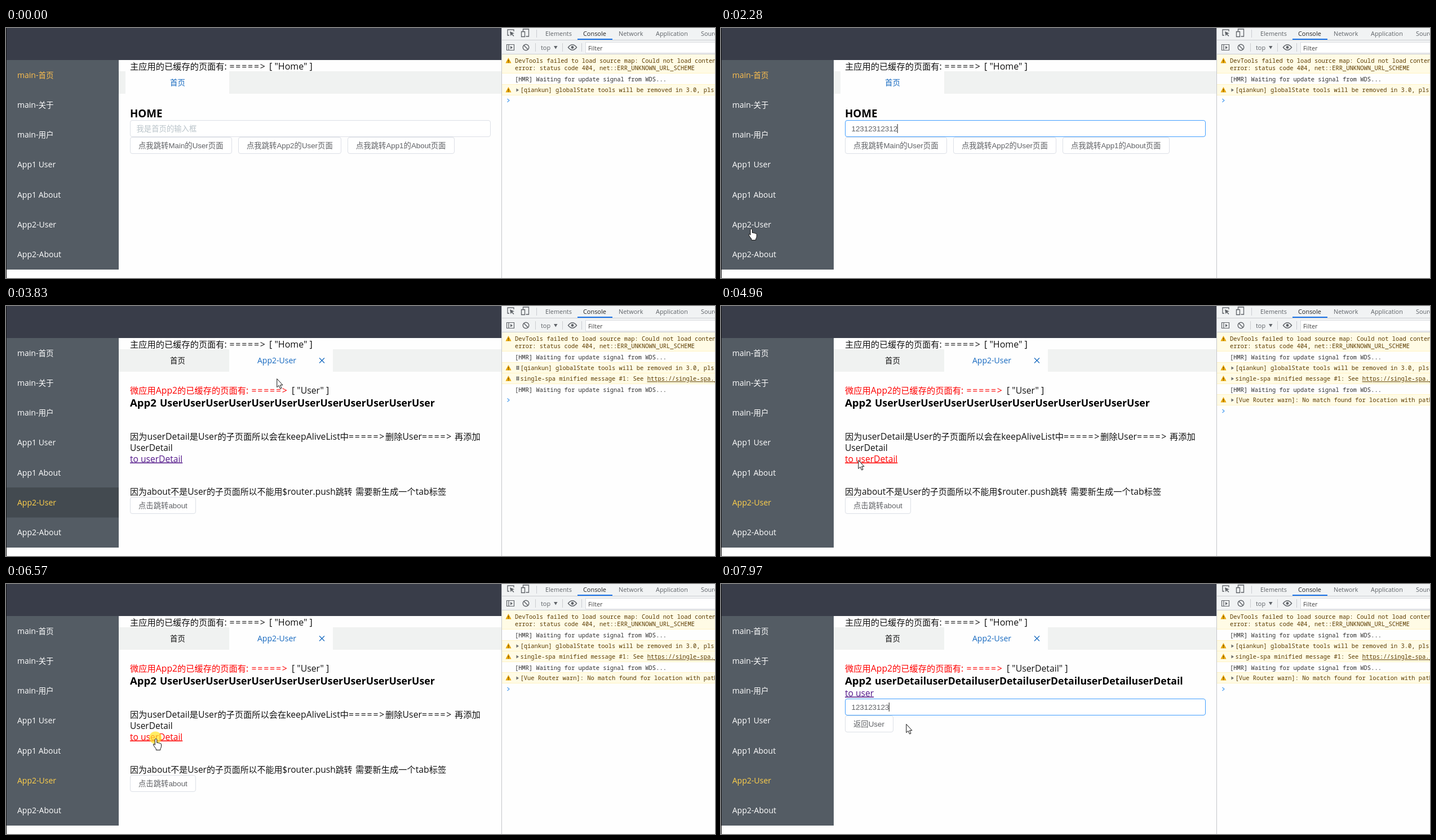
Write an HTML page that moves like this. It is 1258 px wide and 445 px high and loops after 8000 ms.

```html
<!DOCTYPE html>
<html lang="zh">
<head>
<meta charset="utf-8">
<title>Tabs</title>
<style>
html, body { margin: 0; width: 100%; height: 100%; overflow: hidden; background: #fefefe; }
svg { display: block; width: 100vw; height: 100vh; }
text { white-space: pre; }
.ui { font-family: "Open Sans", "Noto Sans CJK SC", "Noto Sans CJK", sans-serif; }
.el { font: 13.35px "Liberation Sans", "Noto Sans CJK SC", "Noto Sans CJK", sans-serif; fill: #606266; }
.mono { font: 10.43px "Noto Sans Mono", "DejaVu Sans Mono", monospace; fill: #303030; }
.warn { fill: #5c3c00; }
.bold { font-weight: 700; }
.link { text-decoration: underline; }
</style>
</head>
<body>
<svg id="stage" viewBox="0 0 1258 445" preserveAspectRatio="none"></svg>
<script>
const LOOP = 8000;
const LINK = '#551a8b', BLUE = '#1568bf';

const rect = (x, y, w, h, fill, more = '') =>
  `<rect x="${x}" y="${y}" width="${w}" height="${h}" fill="${fill}" ${more}/>`;
const path = (d, stroke, more = '') => `<path d="${d}" fill="none" stroke="${stroke}" ${more}/>`;
const text = (x, y, str, cls, more = '') => `<text x="${x}" y="${y}" class="${cls}" ${more}>${str}</text>`;
const group = (id, body) => `<g id="${id}">${body}</g>`;

// Chinese runs are set slightly smaller, arrows of "=" slightly wider.
function mix(x, y, str, size = 15.8, fill = '#111', more = '') {
  const runs = str.match(/[\u3000-\u9fff]+|[=>]+|[^\u3000-\u9fff=>]+/g).map(run => {
    if (/[\u3000-\u9fff]/.test(run)) return `<tspan font-size="${size * 0.965}">${run}</tspan>`;
    if (/[=>]/.test(run)) return `<tspan letter-spacing=".115em">${run}</tspan>`;
    return `<tspan>${run}</tspan>`;
  });
  return text(x, y, runs.join(''), 'ui', `font-size="${size}" fill="${fill}" ${more}`);
}

const frame = (x, y, w, h, more = '') =>
  rect(x + .5, y + .5, w - 1, h - 1, '#fff', `rx="3.5" stroke="#dcdfe6" ${more}`);
const button = (x, y, w, label) => frame(x, y, w, 30) + text(x + 15, y + 20, label, 'el');
const field = (id, y) =>
  frame(220, y, 640, 30, `id="${id}Box"`) + text(231.5, y + 20, '', 'el', `id="${id}Text"`) +
  rect(0, y + 7, 1, 16, '#222', `id="${id}Caret"`);

function heading(y, rest, size) {
  return text(220, y, 'App2', 'ui bold', 'font-size="18.6"') +
    text(273, y, rest, 'ui bold', `font-size="${size}"`);
}

const menu = ['main-首页', 'main-关于', 'main-用户', 'App1 User', 'App1 About', 'App2-User', 'App2-About'];

function shell() {
  return rect(0, 0, 1258, 445, '#fefefe') + rect(0, 0, 880, 57, '#393d49') +
    rect(0, 57, 200, 373, '#545c64') + rect(0, 323, 200, 53.5, '#434a50', 'id="hover"') +
    rect(0, 0, 1, 445, '#111') +
    menu.map((m, i) => mix(20, 88.7 + i * 53.2, m, 14, '#fff', `id="item${i}" font-weight="500"`)).join('') +
    mix(220, 73.5, '主应用的已缓存的页面有:') + mix(396.5, 73.5, '=====>') + mix(467, 73.5, '[ "Home" ]', 16) +
    rect(200, 77, 680, 40, '#f0f2f1') + rect(212, 77, 184, 40, '#fefefe', 'id="tabBg"') +
    mix(291, 102, '首页', 13.9, BLUE, 'id="homeTab"') +
    group('appTab', mix(446, 102, 'App2-User', 14, BLUE) + path('M556 92.5l9 9m0-9l-9 9', BLUE, 'stroke-width="1.2"'));
}

function pages() {
  const cached = (names) =>
    mix(220, 156, '微应用App2的已缓存的页面有:', 15.8, '#f00') + mix(435.5, 156, '=====>', 15.8, '#f00') +
    mix(507, 156, `[ "${names}" ]`);
  return group('home', text(220, 159, 'HOME', 'ui bold', 'font-size="18.8"') + field('home', 164) +
      button(220, 194, 181, '点我跳转Main的User页面') + button(412, 194, 183, '点我跳转App2的User页面') +
      button(606, 194, 190, '点我跳转App1的About页面')) +
    group('user', cached('User') + heading(179, 'User'.repeat(12), 17.7) +
      mix(220, 238, '因为userDetail是User的子页面所以会在keepAliveList中') +
      mix(608, 238, '=====>删除User====>') + mix(796, 238, '再添加') + mix(220, 258, 'UserDetail', 15.5) +
      text(220, 277.5, 'to userDetail', 'ui link', 'font-size="15.6" id="toDetail"') +
      mix(220, 336, '因为about不是User的子页面所以不能用$router.push跳转', 15.5) +
      mix(620, 336, '需要新生成一个tab标签') + button(220, 340, 117, '点击跳转about')) +
    group('detail', cached('UserDetail') + heading(179, 'userDetail'.repeat(6), 17.6) +
      text(220, 199.5, 'to user', 'ui link', `font-size="15.6" fill="${LINK}"`) +
      field('detail', 204) + button(220, 234, 86, '返回User'));
}

function devtools() {
  const label = (x, y, s, fill = '#5f6368') => text(x, y, s, 'ui', `font-size="10.9" fill="${fill}"`);
  const band = (y, h) => rect(880, y, 378, h, '#fffbe5') +
    path(`M880 ${y - .5}h378m0 ${h}h-378`, '#fff3c4');
  const sign = y => `<path d="M891.5 ${y - 5}l5 9.5h-10z" fill="#e8a500"/>` +
    path(`M891.5 ${y - 1.5}v3m0 1v1.3`, '#4a3300');
  const fold = y => `<path class="fold" d="M905.5 ${y - 3}l4.5 3-4.5 3z" fill="#6e6e6e"/>` +
    path(`M905.5 ${y - 3}h5m-5 2.5h5m-5 2.5h5m-4 1v-7m3 0v7`, '#555', 'class="glitch"');
  const warning = (y, s) => band(y, 19) + sign(y + 9) + fold(y + 9.5) + text(912.5, y + 13.3, s, 'mono warn');
  const hmr = y => text(903, y, '[HMR] Waiting for update signal from WDS...', 'mono');
  const icon = '#5f6368';
  return rect(879, 0, 379, 445, '#fefefe') + rect(880, 0, 378, 47, '#f1f3f4') +
    rect(880, 21, 378, 1, '#cbcdd1') + rect(879, 0, 1, 445, '#c4c6ca') +
    path('M893 13h-3v-10h11v3', icon, 'stroke-width="1.3"') +
    `<path d="M894 6l8 3.5-3.5 1 3 3.5-1.2 1-3-3.5-1.8 3z" fill="${icon}"/>` +
    path('M917.5 6v-4h10v13h-5M914.5 6.5h6v9h-6z', icon, 'stroke-width="1.3"') +
    path('M941.5 3v14M939.5 27v15M987.5 27v15M1021.5 27v15', '#cbcdd1') +
    label(957, 13.5, 'Elements') + label(1024, 13.5, 'Console', '#222') + label(1087, 13.5, 'Network') +
    label(1153, 13.5, 'Application') + label(1233, 13.5, 'Sources') + rect(1014, 19, 62, 2, '#1a73e8') +
    path('M888.5 29.5h13v10h-13zM892 29v11', icon, 'stroke-width="1.2"') +
    `<path d="M895 32l4 2.7-4 2.7z" fill="${icon}"/>` +
    `<circle cx="922.5" cy="34.5" r="5.3" fill="none" stroke="${icon}" stroke-width="1.4"/>` +
    path('M919 31l7 7', icon, 'stroke-width="1.4"') +
    label(949, 39, 'top') + `<path d="M972 32h6.5l-3.2 5.5z" fill="${icon}"/>` +
    path('M997.5 34.5q7.5-9.5 15 0q-7.5 9.5-15 0z', icon, 'stroke-width="1.5"') +
    `<circle cx="1005" cy="34.5" r="2.4" fill="${icon}"/>` +
    rect(1028.5, 25.5, 240, 19, '#fff', 'stroke="#dadce0"') + label(1033, 39.5, 'Filter', '#444') +
    band(47, 34) + rect(880, 46, 378, 1, '#cbcdd1') + sign(58) +
    text(903, 62, 'DevTools failed to load source map: Could not load content', 'mono warn') +
    text(903, 75.3, 'error: status code 404, net::ERR_UNKNOWN_URL_SCHEME', 'mono warn') + hmr(95.3) +
    warning(101, '[qiankun] globalState tools will be removed in 3.0, pls') +
    group('spa', warning(120, 'single-spa minified message #1: See <tspan class="link">https://single-spa.js</tspan>')) +
    group('hmr', hmr(153.3)) +
    group('router', warning(158, '[Vue Router warn]: No match found for location with path')) +
    path('M889.5 126l3.5 3-3.5 3', '#4a9df0', 'stroke-width="1.2" id="prompt"');
}

function pointers() {
  const shape = (id, d) => `<path id="${id}" d="${d}" fill="#fff" stroke="#111" stroke-linejoin="round"/>`;
  return group('pointer',
    '<circle id="click" cx="-1" cy="-1.5" r="11" fill="#ffe629" fill-opacity=".72"/>' +
    shape('arrow', 'M.8.5v15l3.4-3 2.4 5.5 2.4-1-2.4-5.3h4.4z') +
    shape('hand', 'M-1.7 1.6q1.7-2.4 3.4 0v6q1.4-1 2.8.5 1.4-.8 2.6.7 2-.5 2.4 1.4v4q-.3 2.5-1.6 4.2v2.2h-7.6v-2.2q-3-3.4-5-7.4 .2-2 2-.9l1 1.3z') +
    path('M-3.5-8h2.5l1 1 1-1h2.5M0-7v14M-3.5 8h2.5l1-1 1 1h2.5', '#222', 'id="beam" stroke-width="1.2"'));
}

const stage = document.getElementById('stage');
stage.innerHTML = shell() + pages() + devtools() + pointers();
const el = {};
stage.querySelectorAll('[id]').forEach(n => el[n.id] = n);
const folds = stage.querySelectorAll('.fold'), glitches = stage.querySelectorAll('.glitch');

// time, x, y
const track = [
  [0, 750, 470], [205, 750, 470], [210, 748, 438], [290, 601, 438], [540, 598, 436], [800, 460, 330],
  [1050, 250, 225], [1150, 210, 195], [1340, 275, 187], [1440, 283, 170], [1740, 283, 170],
  [2000, 235, 235], [2250, 60, 350], [2400, 30, 384], [2510, 50, 386], [2700, 80, 377], [2970, 91, 369],
  [3300, 91, 366], [3440, 120, 340], [3600, 330, 210], [3830, 480, 129], [4190, 470, 146],
  [4600, 330, 250], [4960, 243, 274], [5200, 243, 274], [5500, 264, 248], [5900, 267, 234],
  [6400, 266, 275], [6640, 266, 275], [6800, 288, 228], [6950, 306, 211], [7130, 310, 211],
  [7300, 334, 232], [7969, 334, 232], [7970, 328, 249], [8000, 328, 249]
];
const kinds = [[0, 'arrow'], [1340, 'beam'], [1900, 'arrow'], [2250, 'hand'], [3440, 'arrow'],
  [5400, 'hand'], [6760, 'arrow'], [6900, 'beam'], [7970, 'arrow']];
const clicks = [[1500, 1740], [3200, 3300], [5050, 5130], [5600, 5700], [6570, 6720], [7110, 7200]];

const within = (t, a, b) => t >= a && t < b;
const show = (node, on) => node.setAttribute('display', on ? 'inline' : 'none');
const clamp = (v, a, b) => Math.min(b, Math.max(a, v));

function place(t) {
  const i = Math.max(1, track.findIndex(k => k[0] > t));
  const [t0, x0, y0] = track[i - 1], [t1, x1, y1] = track[i];
  const p = (t - t0) / (t1 - t0);
  return [x0 + (x1 - x0) * p, y0 + (y1 - y0) * p];
}

function input(id, count, border, caret, hint = '') {
  el[id + 'Text'].textContent = '123'.repeat(5).slice(0, count) || hint;
  el[id + 'Text'].style.fill = count ? '#606266' : '#b9c3c9';
  el[id + 'Box'].setAttribute('stroke', border);
  el[id + 'Caret'].setAttribute('x', 231 + count * 7.42);
  show(el[id + 'Caret'], caret);
}

function draw(t) {
  const app = t >= 3290;
  const detail = within(t, 5050, 5650) || t >= 6640;
  show(el.home, !app);
  show(el.detail, detail);
  show(el.user, t >= 3480 && !detail);
  show(el.appTab, app);
  el.tabBg.setAttribute('x', app ? 396 : 212);
  el.homeTab.setAttribute('fill', app ? '#111' : BLUE);
  el.item0.setAttribute('fill', app ? '#fff' : '#fdbf4e');
  el.item5.setAttribute('fill', app ? '#ffd04b' : '#fff');
  show(el.hover, within(t, 2300, 4000));

  const pressed = within(t, 4960, 5050) || within(t, 6570, 6640);
  el.toDetail.setAttribute('fill', pressed ? '#f00' : LINK);
  input('home', clamp(Math.ceil((t - 1740) / 50), 0, 15),
    t < 1420 ? '#dcdfe6' : t < 1740 ? '#c0c4cc' : '#409eff', t >= 1500, '我是首页的输入框');
  input('detail', clamp(Math.ceil((t - 7250) / 70), 0, 9),
    t < 7110 ? '#dcdfe6' : '#409eff', t >= 7110);

  const spa = t >= 3370, hmr = t >= 3480, router = t >= 4000;
  show(el.spa, spa);
  show(el.hmr, hmr);
  show(el.router, router);
  el.prompt.setAttribute('transform', `translate(0 ${router ? 58 : hmr ? 38.5 : spa ? 19 : 0})`);
  const glitch = within(t, 3370, 4270);
  folds.forEach(n => show(n, !glitch));
  glitches.forEach(n => show(n, glitch));

  const kind = kinds.filter(k => k[0] <= t).pop()[1];
  for (const k of ['arrow', 'hand', 'beam']) show(el[k], k === kind);
  show(el.click, clicks.some(([a, b]) => within(t, a, b)));
  el.pointer.setAttribute('transform', `translate(${place(t)})`);
}

const start = performance.now();
function tick() {
  draw((performance.now() - start) % LOOP);
  requestAnimationFrame(tick);
}
tick();
</script>
</body>
</html>
```
